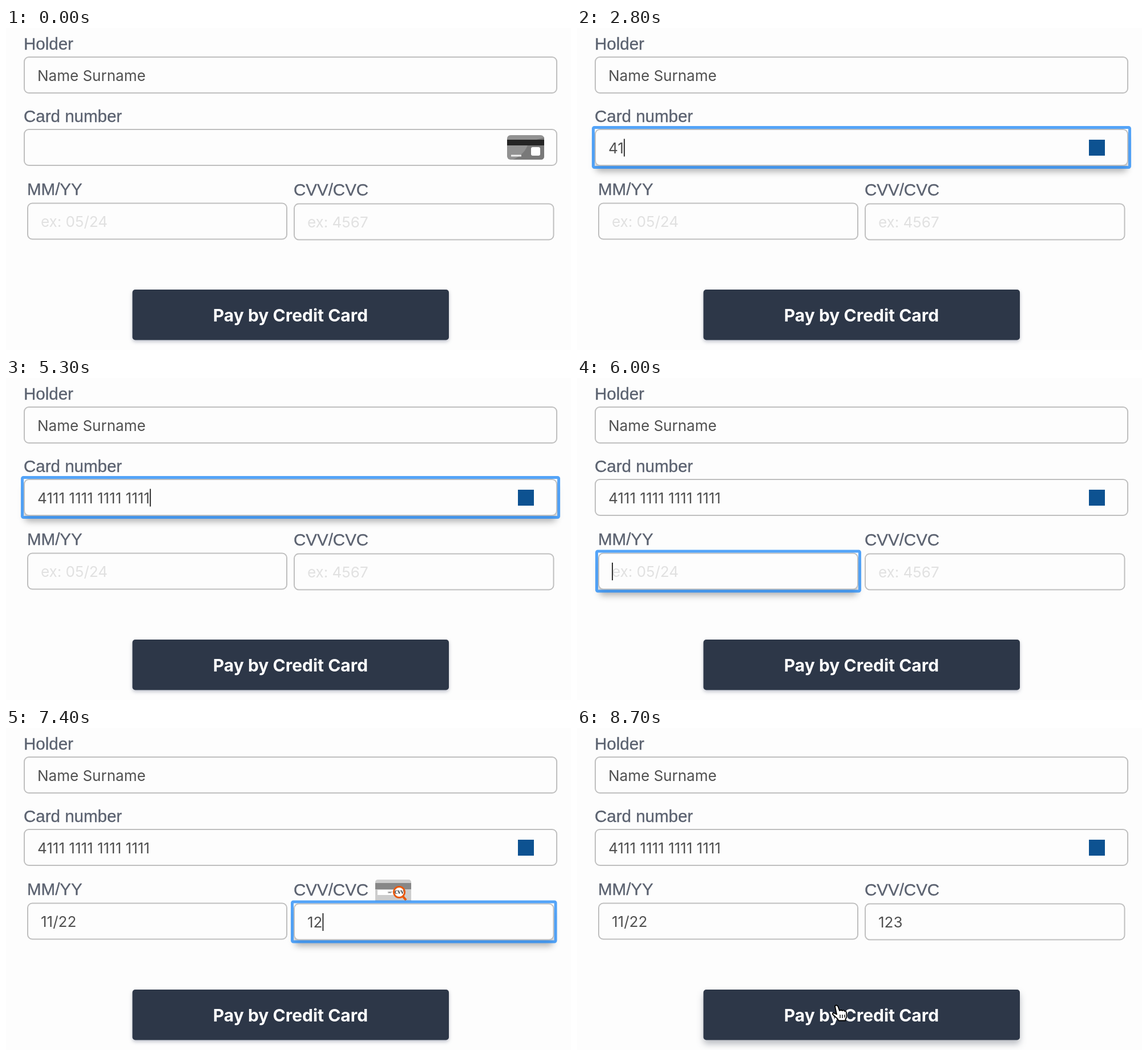
These frames come from a looping animation (990x565 px, 9.2 s). An HTML page:

```html
<!DOCTYPE html>
<html lang="en">
<head>
<meta charset="utf-8">
<title>Card payment form</title>
<style>
html, body { margin: 0; width: 100%; height: 100%; overflow: hidden; background: #fdfdfd; }
svg { display: block; width: 990px; height: 565px; }
.label { font: 29.5px "Liberation Sans", Arial, sans-serif; fill: #5b6270; stroke: #5b6270; stroke-width: .35px; }
.value { font: 26px Inter, sans-serif; fill: #505050; }
.value.hint { fill: #e1e1e1; }
.box { fill: #fdfdfd; stroke: #bfbfbf; stroke-width: 2; }
.ring { fill: none; stroke: rgba(34, 138, 248, .77); stroke-width: 5; }
.shade { fill: #000; fill-opacity: .3; filter: blur(6px); }
.caret { fill: #333; }
.pay { font: bold 30px Inter, sans-serif; fill: #fff; text-anchor: middle; }
</style>
</head>
<body>
<svg viewBox="0 0 990 565">
  <g id="form"></g>

  <g id="blank" style="filter: blur(.5px)">
    <rect x="878" y="188" width="65" height="43" rx="6" fill="#929292"/>
    <path d="M888 231Q910 222 916 200L943 192V225Q943 231 937 231Z" fill="#797979"/>
    <path d="M878 196H943V206H878Z" fill="#242424"/>
    <rect x="920" y="209" width="16" height="15" rx="3" fill="#fff"/>
    <path d="M885 224H903" stroke="#eee" stroke-width="3"/>
  </g>
  <rect id="brand" x="897" y="196" width="28" height="28" fill="#0d5291"/>

  <g id="help">
    <path d="M647 304V271Q647 266 652 266H705Q710 266 710 271V304Z" fill="#cdcdcd"/>
    <path d="M647 272H710V283H647Z" fill="#878787"/>
    <path d="M651 284H690V293H651Z" fill="#fff"/>
    <text x="669" y="290" font-family="Liberation Serif, serif" font-size="5" font-style="italic">987</text>
    <path d="M695 295L701 302" stroke="#e9590c" stroke-width="4"/>
    <circle cx="689" cy="288" r="9.5" fill="#fff" stroke="#e9590c" stroke-width="3"/>
    <text x="689" y="291" text-anchor="middle" font-family="Liberation Serif, serif" font-size="7.5" font-weight="bold">CVV</text>
  </g>
  <g id="rings"></g>

  <rect id="button" x="221.5" y="459" width="554.5" height="88.5" rx="5" fill="#2d3748"/>
  <text class="pay" x="498.5" y="514.5">Pay by Credit Card</text>

  <g id="beam" fill="none" stroke-linecap="round">
    <path id="stem" d="M-6-14Q0-14 0-10Q0-14 6-14M0-10V10M-6 14Q0 14 0 10Q0 14 6 14M-3 1H3" stroke="#fff" stroke-width="4.5"/>
    <use href="#stem" style="stroke: #000"/>
    <path d="M-6-14Q0-14 0-10Q0-14 6-14M0-10V10M-6 14Q0 14 0 10Q0 14 6 14M-3 1H3" stroke="#000" stroke-width="2.2"/>
  </g>
  <g id="hand" stroke="#000" stroke-linejoin="round">
    <path transform="translate(-456 -499)" fill="#fff" stroke-width="1.8" d="M452 488q2-3 5 0l3 8q3-2 5 0q3-1.5 4 1q3-.5 3 2.5l.5 6q0 3-2 5v3h-12q-1-3-4-5l-6.5-6q-1-3 3-2l4 2z"/>
    <path transform="translate(-456 -499)" fill="none" stroke-width="1.4" d="M461 503v6M465 503v6M469 503v5"/>
  </g>
</svg>
<script>
const LOOP = 9200, STEP = 100;
const $ = id => document.getElementById(id);
const clamp = v => Math.max(0, Math.min(1, v));
const ease = p => p * p * (3 - 2 * p);
const show = (el, on) => el.style.display = on ? '' : 'none';

function add(parent, tag, attrs, text = '') {
  const el = document.createElementNS('http://www.w3.org/2000/svg', tag);
  for (const k in attrs) el.setAttribute(k, attrs[k]);
  el.textContent = text;
  parent.append(el);
  return el;
}

// focus: [start, end]; keys: the time of each typed digit
const fields = [
  { label: 'Holder', x: 31, y: 50, w: 935, base: 38, hint: '', fixed: 'Name Surname' },
  { label: 'Card number', x: 31, y: 177, w: 935, base: 165, hint: '', digits: '4111111111111111',
    focus: [2000, 5900],
    keys: [2600, 2800, 2900, 3100, 3300, 3400, 3500, 3600, 3800, 4000, 4200, 4400, 4600, 4700, 4900, 5100],
    format: s => s.replace(/(.{4})(?=.)/g, '$1 ') },
  { label: 'MM/YY', x: 37, y: 306.5, w: 456, base: 293, hint: 'ex: 05/24', digits: '1122',
    focus: [5900, 7000], keys: [6300, 6500, 6700, 6900],
    format: s => s.replace(/^(..)/, '$1/') },
  { label: 'CVV/CVC', x: 504, y: 307.5, w: 456.5, base: 293.5, hint: 'ex: 4567', digits: '123',
    focus: [7000, 8400], keys: [7200, 7400, 7500], format: s => s },
];

for (const f of fields) {
  const { x, y, w } = f, h = 65, form = $('form');
  add(form, 'text', { class: 'label', x, y: f.base }, f.label);
  if (f.focus) f.shade = add(form, 'rect', { class: 'shade', x: x + 2, y: y + 13, width: w - 4, height: h - 3, rx: 6 });
  add(form, 'rect', { class: 'box', x: x + 1, y: y + 1, width: w - 2, height: h - 2, rx: 8 });
  f.text = add(form, 'text', { class: 'value', x: x + 24, y: y + 42.5 }, f.fixed);
  if (!f.focus) continue;
  f.caret = add(form, 'rect', { class: 'caret', y: y + 17.5, width: 2, height: 31 });
  f.ring = add($('rings'), 'rect', { class: 'ring', x: x - 2.5, y: y - 2.5, width: w + 5, height: h + 5, rx: 2 });
}

function drawField(f, t) {
  const [start, end] = f.focus;
  const glow = Math.min(clamp((t - start + 50) / 150), clamp((end - t + 50) / 150));
  const typed = f.format(f.digits.slice(0, f.keys.filter(k => k <= t).length));
  f.text.textContent = typed || f.hint;
  f.text.classList.toggle('hint', !typed);
  f.shade.style.opacity = f.ring.style.opacity = glow;
  show(f.caret, t >= start && t < end);
  f.caret.setAttribute('x', f.x + 24 + (typed ? f.text.getComputedTextLength() : 0));
}

function pointer(t) {
  const a = ease(clamp((t - 1500) / 400)), b = ease(clamp((t - 7700) / 400));
  return [700 - 68 * a - 176 * b, 226 - 9 * a + 282 * b];
}

function draw(now) {
  const t = Math.floor(now % LOOP / STEP) * STEP;
  fields.filter(f => f.focus).forEach(f => drawField(f, t));
  const [, card, , code] = fields;
  show($('blank'), t < card.keys[0]);
  show($('brand'), t >= card.keys[0]);
  show($('help'), t >= code.focus[0] && t < code.focus[1]);

  const [x, y] = pointer(t), hover = y > 459;
  const visible = t >= 1500 && t < card.keys[0] || t >= 7700;
  for (const id of ['beam', 'hand']) {
    show($(id), visible && hover === (id === 'hand'));
    $(id).setAttribute('transform', `translate(${x} ${y})`);
  }
  $('button').style.filter = hover
    ? 'drop-shadow(0 7px 6px rgba(30, 40, 60, .3))'
    : 'drop-shadow(0 3px 3px rgba(45, 55, 90, .3))';
  requestAnimationFrame(draw);
}
requestAnimationFrame(draw);
</script>
</body>
</html>
```
